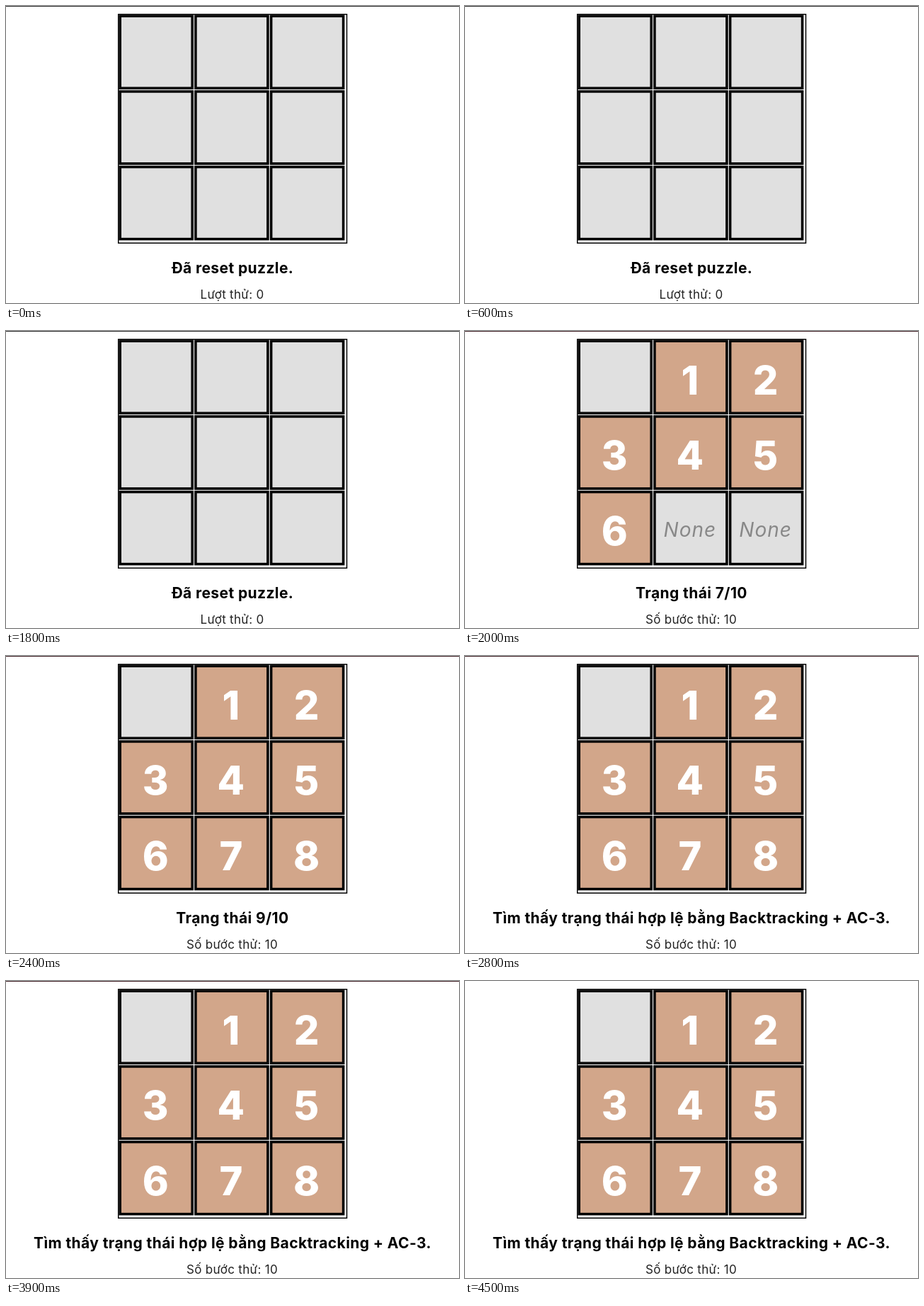
Write an HTML page that moves like this. It is 640 by 420 pixels and loops after 4700 ms.

```html
<!DOCTYPE html>
<html lang="vi">
<head>
<meta charset="utf-8">
<style>
  html, body { margin: 0; width: 100%; height: 100%; overflow: hidden; background: #fff; }
  svg { display: block; }
  text { font-family: Inter, "Open Sans", sans-serif; text-anchor: middle; fill: #000; }
  .cell { stroke: #000; stroke-width: 3.6; }
  .digit { font-size: 56px; font-weight: 800; fill: #fff; }
  .none { font-size: 28px; font-style: italic; letter-spacing: 1px; fill: #888; }
  #title { font-size: 21px; font-weight: 700; letter-spacing: .4px; }
  #count { font-size: 17px; letter-spacing: .3px; fill: #222; }
</style>
</head>
<body>
<svg width="640" height="420" viewBox="0 0 640 420">
  <rect id="edge" width="640" height="1"/>
  <rect x="158.75" y="11.75" width="322.75" height="323.5" fill="#fff" stroke="#000" stroke-width="1.5"/>
  <g id="grid"></g>
  <text id="title" x="320" y="378"></text>
  <text id="count" x="319.5" y="414"></text>
</svg>
<script>
const LOOP = 4700, START = 2000, STEP = 200, FOUND = 2600, EDGE_GONE = 4300;
const PITCH = 106.7, SIZE = 102;
const $ = id => document.getElementById(id);

function add(tag, attrs) {
  const el = document.createElementNS("http://www.w3.org/2000/svg", tag);
  for (const key in attrs) el.setAttribute(key, attrs[key]);
  return $("grid").appendChild(el);
}

const cells = Array.from({ length: 9 }, (_, i) => {
  const x = 161.2 + i % 3 * PITCH, y = 14.2 + Math.floor(i / 3) * PITCH;
  return {
    box: add("rect", { class: "cell", x, y, width: SIZE, height: SIZE }),
    label: add("text", { x: x + 50, y: y + 75 }),
    y
  };
});

function draw(t) {
  const running = t >= START, found = t >= FOUND;
  const placed = running ? Math.min(9, 7 + Math.floor((t - START) / STEP)) : 0;

  cells.forEach(({ box, label, y }, i) => {
    const filled = i > 0 && i < placed;
    const none = running && i >= placed;
    box.setAttribute("fill", filled ? "#d2a68a" : "#e0e0e0");
    label.setAttribute("class", none ? "none" : "digit");
    label.setAttribute("y", y + (none ? 63.5 : 75.3));
    label.textContent = filled ? i : none ? "None" : "";
  });

  $("title").textContent = found ? "Tìm thấy trạng thái hợp lệ bằng Backtracking + AC-3."
    : running ? `Trạng thái ${placed}/10` : "Đã reset puzzle.";
  $("count").textContent = running ? "Số bước thử: 10" : "Lượt thử: 0";
  $("edge").setAttribute("fill", t >= EDGE_GONE ? "#fff" : running ? "#46262c" : "#333");
}

const begin = performance.now();
function frame() {
  draw((performance.now() - begin) % LOOP);
  requestAnimationFrame(frame);
}
frame();
</script>
</body>
</html>
```
